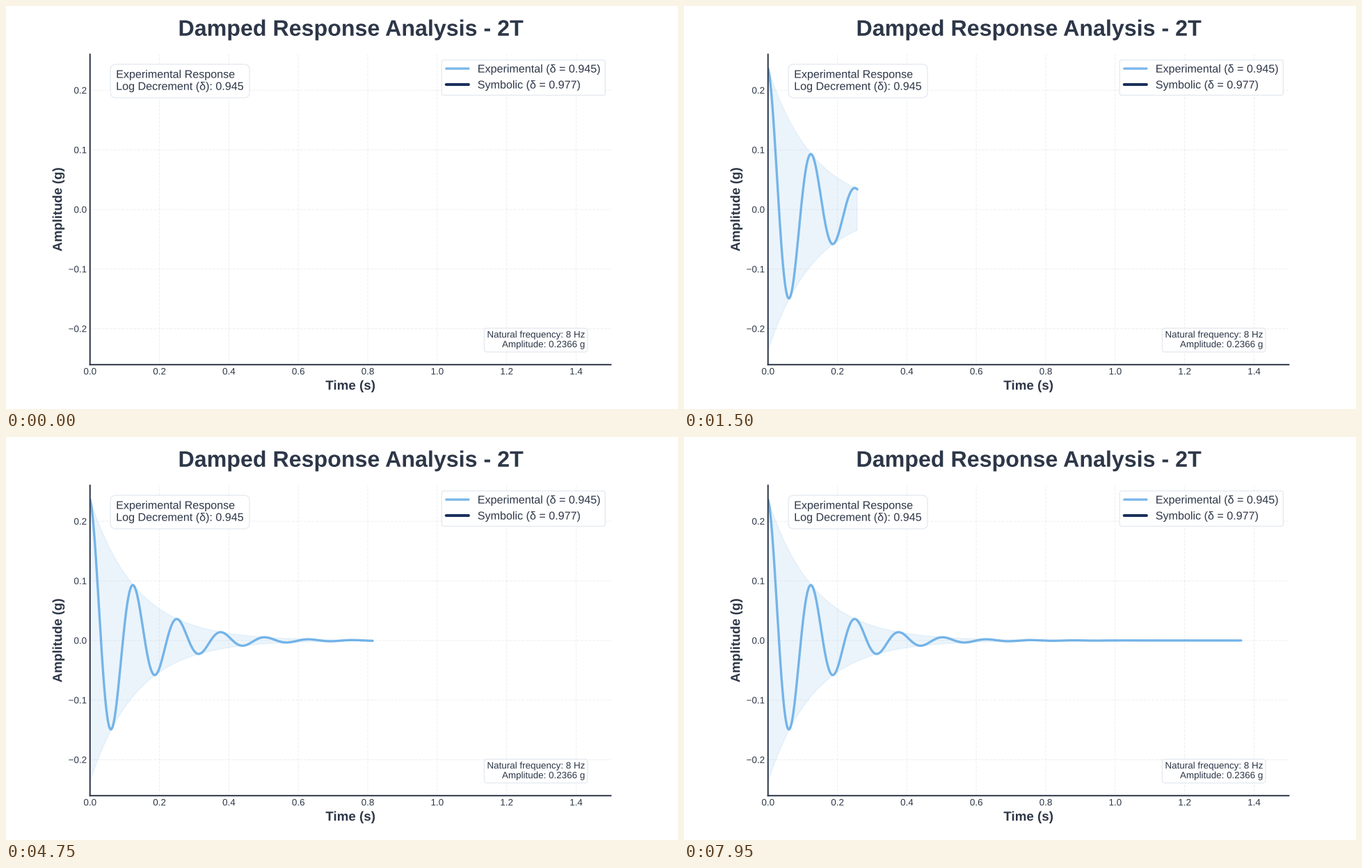
Recreate the animation shown at these times as a matplotlib script. Size 966 px wide and 580 px high, loop 8 s.

```python
import numpy as np
import matplotlib.pyplot as plt
from matplotlib.animation import FuncAnimation
from matplotlib.patheffects import Normal

DPI = 96.6
INK, EDGE = "#2D3748", "#E2E8F0"
BLUE, NAVY = "#4299E1", "#1A305C"
AMP, FREQ, DECREMENT = 0.2366, 8, 0.945
FRAMES, INTERVAL = 160, 50
STEP = 1.5 / 175  # seconds of signal drawn per frame

plt.rcParams.update({
    "font.family": "Liberation Sans",
    "text.hinting": "no_hinting",
    "text.color": INK,
    "axes.labelcolor": INK,
    "axes.edgecolor": INK,
    "axes.linewidth": 1.5,
    "axes.axisbelow": True,
    "xtick.color": INK,
    "ytick.color": INK,
    "xtick.major.size": 0,
    "ytick.major.size": 0,
    "lines.solid_capstyle": "round",
    # outlines and text keep their sub-pixel positions
    "path.snap": False,
    "path.effects": [Normal()],
})

zeta = DECREMENT / np.hypot(2 * np.pi, DECREMENT)
omega = 2 * np.pi * FREQ
omega_d = omega * np.sqrt(1 - zeta**2)


def envelope(t):
    return AMP * np.exp(-zeta * omega * t)


def response(t):
    return envelope(t) * np.cos(omega_d * t)


def note(x, y, text, size, pad, **align):
    ax.text(x, y, text, transform=ax.transAxes, fontsize=size, **align,
            bbox=dict(boxstyle=f"round,pad={pad}", facecolor="white",
                      edgecolor=EDGE, alpha=0.9))


# the small margin keeps the pixel size from rounding down
fig, ax = plt.subplots(figsize=(966.001 / DPI, 580.001 / DPI), dpi=DPI)
ax.set_xlim(0, 1.5)
ax.set_ylim(-1.1 * AMP, 1.1 * AMP)
ax.spines[["top", "right"]].set_visible(False)
ax.spines[["left", "bottom"]].set_path_effects([Normal(offset=(0.3, -0.3))])
ax.grid(True, linestyle="--", linewidth=0.8, color="0.8", alpha=0.3)
ax.set_title("Damped Response Analysis - 2T", fontsize=24,
             fontweight="bold", pad=20)
ax.set_xlabel("Time (s)", fontsize=14, fontweight="bold")
ax.set_ylabel("Amplitude (g)", fontsize=14, fontweight="bold")

band, = ax.fill([], [], color=BLUE, alpha=0.1, linewidth=1)
curve, = ax.plot([], [], color=BLUE, alpha=0.7, linewidth=2.5,
                 label="Experimental (δ = 0.945)")
ax.plot([], [], color=NAVY, linewidth=3, label="Symbolic (δ = 0.977)")
ax.legend(loc="upper right", fontsize=12, frameon=True, facecolor="white",
          edgecolor=EDGE, framealpha=0.9)

note(0.05, 0.95, "Experimental Response\nLog Decrement (δ): 0.945",
     12, 0.5, va="top")
note(0.95, 0.05, "Natural frequency: 8 Hz\nAmplitude: 0.2366 g",
     10, 0.3, ha="right", va="bottom")


def update(i):
    band.set_visible(i > 0)
    curve.set_visible(i > 0)
    t = np.linspace(0, i * STEP, 6 * i + 2)
    env = envelope(t)
    curve.set_data(t, response(t))
    band.set_xy(np.column_stack([np.r_[t, t[::-1]],
                                 np.r_[env, -env[::-1]]]))
    return band, curve


anim = FuncAnimation(fig, update, frames=FRAMES, interval=INTERVAL,
                     init_func=lambda: update(0), repeat=True,
                     repeat_delay=0)
plt.show()
```
